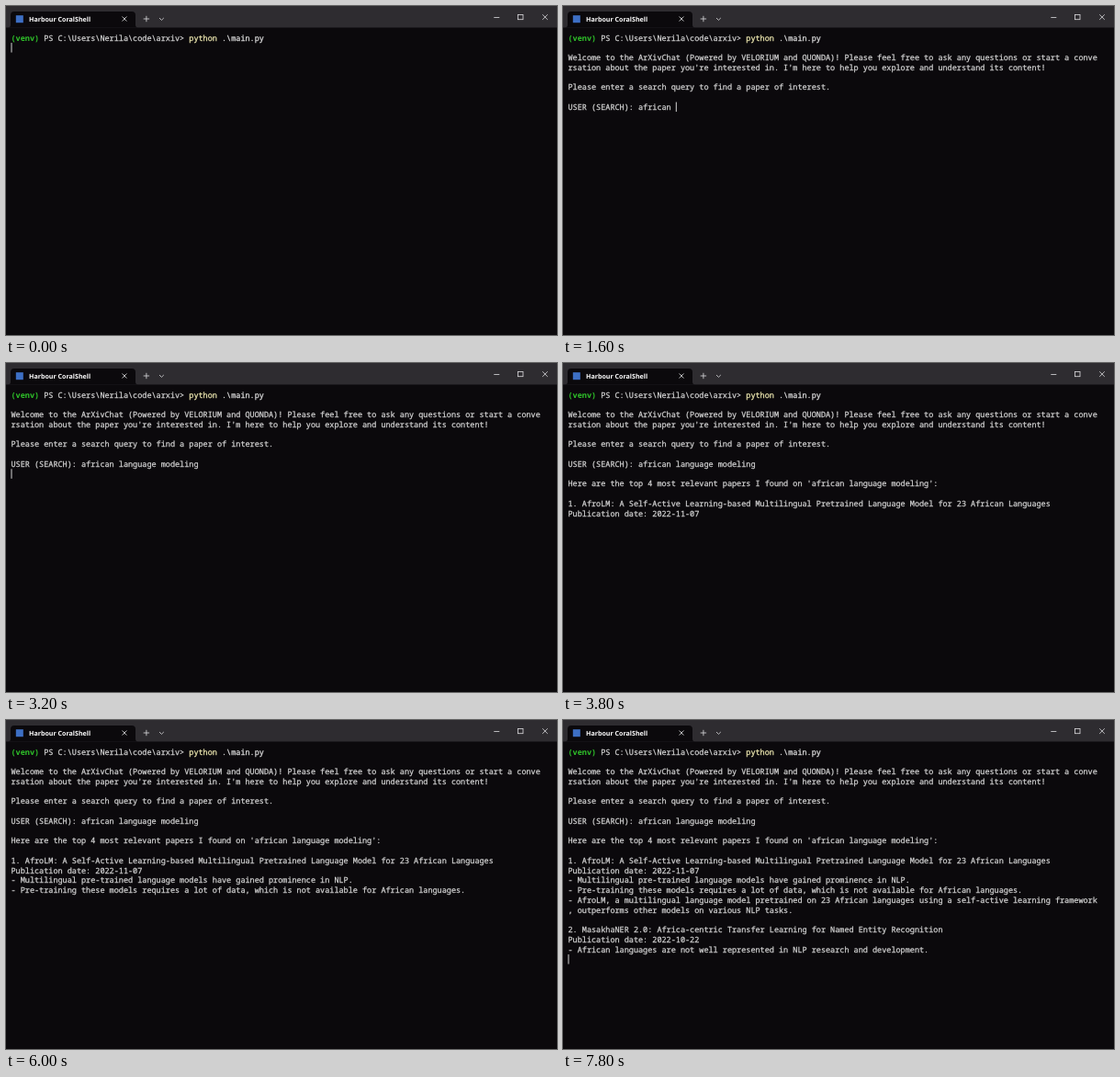
These frames come from a looping animation (600x358 px, 8000 ms). An HTML page:

```html
<!DOCTYPE html>
<html lang="en">
<head>
<meta charset="utf-8">
<title>Terminal session</title>
<style>
  html, body { margin: 0; width: 100%; height: 100%; overflow: hidden; background: #0b090c; }
  svg { display: block; width: 600px; height: 358px; }
  text { text-rendering: geometricPrecision; white-space: pre; }
  .term { font: 8.5px "Noto Sans Mono", "DejaVu Sans Mono", monospace; }
  .term text, .term tspan { color: #d4d4d4; fill: currentColor; stroke: currentColor; stroke-width: .25; }
  .term .venv { font-weight: 700; color: #2fc52a; stroke: none; }
  .term .command { color: #f3edb4; }
  .term .args { color: #e2e2e2; }
  .title { font: 700 7.1px "Open Sans", sans-serif; fill: #fff; }
  .icons { fill: none; stroke: #dedde0; stroke-width: .8; }
</style>
</head>
<body>
<svg viewBox="0 0 600 358">
  <rect width="600" height="358" fill="#0b090c"/>
  <rect width="600" height="23.5" fill="#2e2c30"/>
  <path d="M2 23.5q3 0 3-3V10q0-4 4-4H137q4 0 4 4V20.5q0 3 3 3z" fill="#0b090c"/>
  <rect x="10.8" y="10.2" width="8" height="8" fill="#3d6fc4"/>
  <text class="title" x="25" y="17">Harbour CoralShell</text>
  <g class="icons">
    <path d="M126.5 11.5l5 5m0-5l-5 5"/>
    <path d="M149.7 14h6.4m-3.2-3.2v6.4"/>
    <path d="M167 13l2.4 2.4 2.4-2.4"/>
    <path d="M531.3 12.5h6"/>
    <rect x="557.5" y="9.5" width="5.5" height="5.2"/>
    <path d="M584.2 9.3l5.6 5.6m0-5.6l-5.6 5.6"/>
  </g>
  <g class="term" id="screen">
    <text x="5.5" y="37.6"><tspan class="venv">(venv)</tspan> PS C:\Users\Nerila\code\arxiv> <tspan class="command">python</tspan><tspan class="args"> .\main.py</tspan></text>
  </g>
  <rect id="cursor" width="1" height="10.5" fill="#d4d4d4"/>
</svg>
<script>
const LOOP = 8000, TICK = 200;
const LEFT = 5.5, CHAR = 5.1, ROW = 10.75, BASELINE = 37.6, CURSOR_TOP = 29.3;
const PROMPT = "USER (SEARCH): ", QUERY = "african language modeling";
const PROMPT_ROW = 7, TYPE_START = 1200, ENTER = 2600;

// Each block is printed at once, starting on the given row.
const blocks = [
  { at: 600, row: 2, lines: [
    "Welcome to the ArXivChat (Powered by VELORIUM and QUONDA)! Please feel free to ask any questions or start a conve",
    "rsation about the paper you're interested in. I'm here to help you explore and understand its content!",
    "",
    "Please enter a search query to find a paper of interest."] },
  { at: 3400, row: 9, lines: [
    "Here are the top 4 most relevant papers I found on 'african language modeling':",
    "",
    "1. AfroLM: A Self-Active Learning-based Multilingual Pretrained Language Model for 23 African Languages",
    "Publication date: 2022-11-07"] },
  { at: 4400, row: 13, lines: [
    "- Multilingual pre-trained language models have gained prominence in NLP."] },
  { at: 5400, row: 14, lines: [
    "- Pre-training these models requires a lot of data, which is not available for African languages."] },
  { at: 6200, row: 15, lines: [
    "- AfroLM, a multilingual language model pretrained on 23 African languages using a self-active learning framework",
    ", outperforms other models on various NLP tasks.",
    "",
    "2. MasakhaNER 2.0: Africa-centric Transfer Learning for Named Entity Recognition",
    "Publication date: 2022-10-22"] },
  { at: 7200, row: 20, lines: [
    "- African languages are not well represented in NLP research and development."] }
];

const screen = document.getElementById("screen");
const cursor = document.getElementById("cursor");

function addLine(row, content = "") {
  const line = document.createElementNS("http://www.w3.org/2000/svg", "text");
  line.setAttribute("x", LEFT);
  line.setAttribute("y", BASELINE + row * ROW);
  line.textContent = content;
  screen.append(line);
  return line;
}

for (const block of blocks) {
  block.nodes = block.lines.map((content, i) => addLine(block.row + i, content));
}
const input = addLine(PROMPT_ROW);

function typedCount(t) {
  if (t >= 2400) return QUERY.length;
  return Math.max(0, Math.floor((t - TYPE_START) / 50));
}

function cursorCell(t) {
  if (t < blocks[0].at) return [0, 1];
  if (t < ENTER) return [PROMPT.length + typedCount(t), PROMPT_ROW];
  if (t < blocks[1].at) return [0, PROMPT_ROW + 1];
  const last = blocks.filter(block => t >= block.at).pop();
  return [0, last.row + last.lines.length];
}

function cursorVisible(t) {
  const typing = t >= TYPE_START && t <= ENTER;
  return typing || (t + 600) % 1060 >= 530;
}

function draw(now) {
  const t = Math.floor((now % LOOP) / TICK) * TICK;
  for (const block of blocks) {
    const visibility = t >= block.at ? "visible" : "hidden";
    for (const node of block.nodes) node.setAttribute("visibility", visibility);
  }
  input.textContent = t >= blocks[0].at ? PROMPT + QUERY.slice(0, typedCount(t)) : "";

  const [column, row] = cursorCell(t);
  cursor.setAttribute("x", LEFT + column * CHAR);
  cursor.setAttribute("y", CURSOR_TOP + row * ROW);
  cursor.setAttribute("visibility", cursorVisible(t) ? "visible" : "hidden");
}

const start = performance.now();
function frame() {
  draw(performance.now() - start);
  requestAnimationFrame(frame);
}
frame();
</script>
</body>
</html>
```
